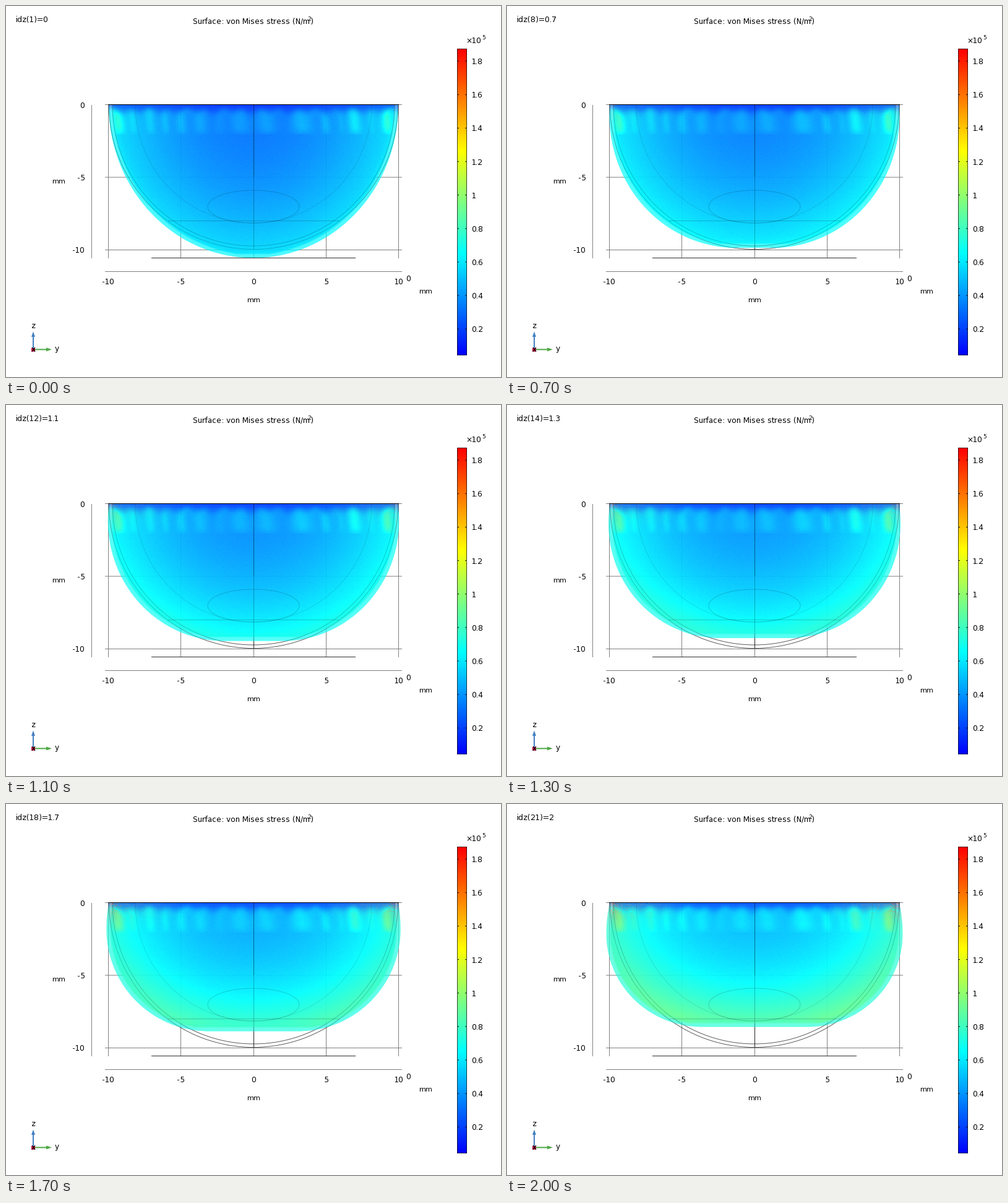
These frames come from a looping animation (800x600 px, 2.1 s). A matplotlib script:

```python
import numpy as np
import matplotlib.pyplot as plt
from matplotlib.animation import FuncAnimation
from matplotlib.colors import LinearSegmentedColormap
from matplotlib.patches import Polygon, Rectangle

DPI = 100
PX = 72 / DPI
STEPS = 21
CX, TOP, FLOOR = 400, 160, 407.5
MM = 23.47

plt.rcParams["font.family"] = "DejaVu Sans"
plt.rcParams["text.hinting_factor"] = 1  # whole-pixel letter advances
fig = plt.figure(figsize=(8, 6), dpi=DPI, facecolor="white")
ax = fig.add_axes([0, 0, 1, 1])
ax.axis("off")

rainbow = LinearSegmentedColormap.from_list(
    "rainbow", ["#0000ff", "#00ffff", "#ffff00", "#ff0000"], N=1024)


def line(xs, ys, color="#808080", lw=1.0, alpha=1.0, z=1):
    ax.plot(xs, ys, color=color, lw=lw * PX, alpha=alpha, zorder=z,
            solid_capstyle="butt", snap=False)


def label(x, base, s, size=12, ha="center"):
    return ax.text(x, base, s, fontsize=size * PX, ha=ha, va="baseline",
                   color="black", zorder=6)


def arc(rx, ry, cy, start, stop, alpha, z):
    a = np.linspace(start, stop, 200)
    line(CX + rx * np.cos(a), cy + ry * np.sin(a), "black", 0.8, alpha, z)


# Pixel grid that holds the deforming body
X0, X1, Y0, Y1 = 150, 650, 150, 420
px, py = np.meshgrid(np.arange(X0, X1) + 0.5, np.arange(Y0, Y1) + 0.5)
u = np.abs(px - CX)
depth = py - TOP
r2 = (u / 235) ** 2
d2 = (depth / 248) ** 2
rng = np.random.default_rng(4)
grain = rng.normal(0, 1, px.shape)
speck = rng.random(px.shape)

# Bright patches in the upper band: centre, width, strength
PATCHES = [(181, 9, .10), (205, 6, .03), (233, 7, .04), (257, 6, .035),
           (283, 8, .045), (314, 11, .04), (345, 10, .02), (378, 16, .045),
           (420, 16, .05), (477, 17, .06), (516, 7, .045), (541, 5, .02),
           (563, 10, .08), (590, 5, .02), (616, 8, .10)]
patches = sum(a * np.exp(-((px - c - (depth - 27) * 0.1) / w) ** 2)
              for c, w, a in PATCHES)
patches = patches * np.exp(-((depth - 27) / 19) ** 4) * (depth < 48)
rim_depth = 10 + 2 * np.sin(px * 0.21) + 1.5 * np.sin(px * 0.097 + 1)
rim = 1 - 0.55 * np.exp(-(depth / rim_depth) ** 2)
hot_corner = np.exp(-((u - 228) / 8) ** 2 - np.clip(depth, 0, 99) / 18)
hot_side = np.clip((u - 110) / 100, 0, 1) * np.exp(-(depth / 24) ** 2)


def edge_distance(s):
    """Approximate distance inside the squeezed outline, s from 0 to 1."""
    bottom = FLOOR - 2 * MM * s
    top_w = 234
    wide = top_w + 5.5 * s ** 2.5
    flat = 85 * s
    mid = TOP + 50 * s
    y = py[:, 0]
    v = np.clip((y - mid) / (bottom - mid), 0, 1)
    half = flat + (wide - flat) * np.sqrt(1 - v ** 2)
    if s > 0:
        bulge = wide - (wide - top_w) * ((mid - y) / (mid - TOP)) ** 2
        half = np.where(y < mid, bulge, half)
    slope = np.gradient(half)
    side = (half[:, None] - u) / np.sqrt(1 + slope[:, None] ** 2)
    return np.minimum(side, bottom - py)


def body(s):
    q = s ** 1.7
    dist = edge_distance(s)
    shell = np.clip((8 - dist) / 3, 0, 1)
    inner = np.clip((16 - dist) / 10, 0, 1)
    t = 0.15 + 0.15 * (r2 + d2) + q * (0.09 + 0.19 * d2) + patches
    blend = np.maximum(shell, 0.4 * inner)
    t += blend * (0.325 + 0.06 * q - t)
    t = t * rim + 0.004 * grain
    rgb = rainbow(np.clip(t, 0, 1))[..., :3]

    heat = 0.08 + 0.92 * q
    for weight, color in ((0.9 * hot_corner, (0.86, 0.24, 0.2)),
                          (0.5 * hot_side, (0.75, 0.6, 0.35))):
        mix = (heat * weight * speck)[..., None]
        rgb = rgb * (1 - mix) + mix * np.array(color)

    alpha = 0.95 - 0.25 * shell
    alpha = alpha * np.clip(dist + 0.5, 0, 1) * (py > TOP - 1)
    return np.dstack([rgb, alpha])


# Grid and axes
for x in (165.5, 282.5, 400.5, 517.5, 634.5):
    line([x, x], [TOP, 408])
for y in (159.5, 277, 394.5):
    line([160, 640], [y, y])
line([138.5, 138.5], [TOP, 408])
line([160, 640], [429.5, 429.5])
line([235, 565], [407.5, 407.5], "#303030", z=4)

# Undeformed geometry: strong behind the body, faint in front of it
for z, alpha in ((1.5, 0.65), (3, 0.2)):
    for r in (233.5, 228):
        arc(r, r, TOP, 0, np.pi, alpha, z)
    line([400.5, 400.5], [TOP, 393], "black", 1, alpha, z)
arc(191, 191, TOP, 0, np.pi, 0.12, 3)
arc(74, 26.5, 324.5, 0, 2 * np.pi, 0.2, 3)
line([262, 539], [347.5, 347.5], "black", 1, 0.2, 3)
line([400.5, 400.5], [TOP, 277], "black", 1, 0.25, 3)
line([165, 635], [159.5, 159.5], "black", 1, 1, 4)

# Axis labels
for y, s in ((165, "0"), (282, "-5"), (399, "-10")):
    label(127.5, y, s, ha="right")
for i, s in enumerate(("-10", "-5", "0", "5", "10")):
    label(165 + 117.5 * i, 450, s)
label(650.5, 445, "0")
for x, y in ((85, 287), (400, 479), (678, 465)):
    label(x, y, "mm", 11)

# Titles
label(302, 29, "Surface: von Mises stress (N/m", ha="left")
label(487, 23.5, "2", 9, "left")
label(492, 29, ")", ha="left")
counter = label(15, 26, "", ha="left")

# Colour bar
ramp = np.linspace(1, 0, 495)[:, None]
ax.imshow(rainbow(ramp), extent=(729, 745, 565, 69), aspect="auto", zorder=2)
ax.add_patch(Rectangle((729.5, 69.5), 15, 495, fill=False, ec="black",
                       lw=PX, alpha=0.7, snap=False, zorder=4))
for i in range(1, 10):
    y = 576.5 - 54.15 * i
    line([730, 732], [y, y], "black", z=4)
    line([742, 744], [y, y], "black", z=4)
    label(752, y + 5, f"{i / 5:g}", ha="left")
label(743.5, 60, "×10", ha="left")
label(769.5, 54.5, "5", 9, "left")

# Orientation triad
BLUE, GREEN = "#4480c0", "#4fa847"
line([44, 44], [555, 533], BLUE, 2, z=4)
line([44, 67], [555.5, 555.5], GREEN, 2, z=4)
ax.add_patch(Polygon([(44, 526.5), (41, 535), (47, 535)], fc=BLUE, lw=0, zorder=5))
ax.add_patch(Polygon([(74, 555.5), (65, 552.5), (65, 558.5)], fc=GREEN, lw=0, zorder=5))
ax.add_patch(Rectangle((41, 553), 6, 5.5, fc="#c0104a", lw=0, zorder=5))
label(44, 521, "z")
label(82.5, 558, "y")
label(44, 559, "x")

surface = ax.imshow(body(0), extent=(X0, X1, Y1, Y0), aspect="auto",
                    interpolation="nearest", zorder=2)
ax.set_xlim(0, 800)
ax.set_ylim(600, 0)


def update(k):
    surface.set_data(body(k / (STEPS - 1)))
    counter.set_text(f"idz({k + 1})={k / 10:g}")
    return surface, counter


anim = FuncAnimation(fig, update, frames=STEPS, interval=100, repeat=True,
                     repeat_delay=0)
plt.show()
```
